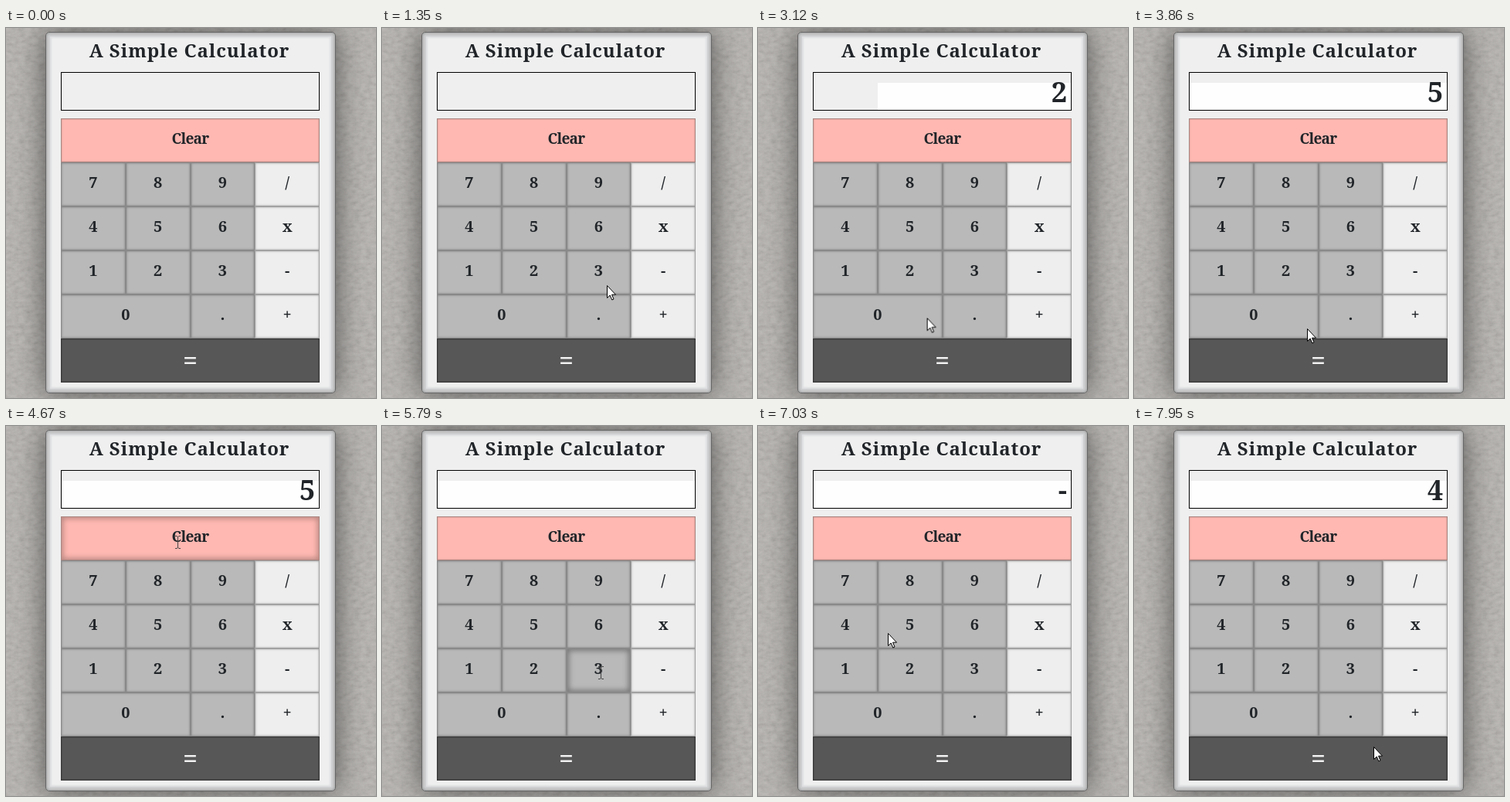
These frames come from a looping animation (479x479 px, 8 s). An HTML page:

```html
<!DOCTYPE html>
<html lang="en">
<head>
<meta charset="utf-8">
<title>A Simple Calculator</title>
<style>
  :root {
    --loop: 8s step-end -5ms infinite;
    --rest: inset 0 0 3px #7d7d7d;
    --down: inset 0 0 7px 2px #777;
  }
  html, body { margin: 0; width: 100%; height: 100%; overflow: hidden; }
  body {
    position: relative;
    background: #b4b1ad;
    color: #212529;
    font: 700 20px "Noto Serif", serif;
  }
  .wall { position: absolute; inset: 0; width: 100%; height: 100%; opacity: .16; }

  .case {
    position: absolute; left: 51px; top: 5px; width: 376px; height: 468px;
    box-sizing: border-box;
    border: 1px solid #666; border-radius: 5px;
    background: #efefef;
    box-shadow: 0 0 38px rgba(0, 0, 0, .55), inset 0 0 4px #858585,
      inset 0 0 0 5px #d0d1d2, inset 0 0 2px 7px #dedfe0;
  }
  h1 {
    position: absolute; left: 0; top: 9px; width: 475px; margin: 0;
    font-size: 24px; line-height: 40px; letter-spacing: .95px;
    text-align: center; white-space: nowrap;
  }

  .screen {
    position: absolute; left: 71px; top: 57px; width: 333px; height: 48px;
    border: 1px solid #000; overflow: hidden;
    background: #efefef;
  }
  .lit {
    position: absolute; left: 100%; right: 0; top: 13px; bottom: 0;
    background: #fefefe;
    animation: lit var(--loop);
  }
  .values {
    position: absolute; right: 5px; top: 0;
    font-size: 36px; line-height: 50px; text-align: right;
    animation: values var(--loop);
  }
  .values span { display: block; height: 48px; }

  .keys {
    position: absolute; left: 71px; top: 117px; width: 335px; height: 342px;
    display: grid; grid-template: repeat(6, 57px) / repeat(4, 1fr);
  }
  .keys div {
    box-sizing: border-box;
    border: 1px solid #898989;
    background: #b9b9b9; box-shadow: var(--rest);
    line-height: 50px; text-align: center;
  }
  .keys .op { --rest: inset 0 0 3px #aaa; background: #eee; border-color: #a2a2a2; }
  .keys .clear {
    --rest: inset 0 0 2px #b98780; --down: inset 0 0 7px 2px #b98780;
    grid-column: span 4; background: #ffb8b2; border-color: #a98681;
    font-size: 19px; letter-spacing: -.7px;
  }
  .keys .zero { grid-column: span 2; }
  .keys .equals {
    --rest: inset 0 0 2px #333; --down: inset 0 0 7px 2px #222;
    grid-column: span 4; background: #575757; border-color: #383838;
    color: #f4f4f4; font-size: 34px; line-height: 54px;
  }

  .three { animation: press-three var(--loop); }
  .plus { animation: press-plus var(--loop); }
  .two { animation: press-two var(--loop); }
  .equals { animation: press-equals var(--loop); }
  .clear { animation: press-clear var(--loop); }
  .minus { animation: press-minus var(--loop); }
  .four { animation: press-four var(--loop); }

  .pointer {
    position: absolute; left: 0; top: 0; width: 1px; height: 1px; overflow: visible;
    animation: travel 8s linear -5ms infinite;
  }
  .arrow { fill: #fff; stroke: #000; animation: arrow var(--loop); }
  .beam { fill: none; stroke: #444; animation: beam var(--loop); }

  @keyframes lit {
    0% { left: 100%; }
    24.125% { left: 167px; }
    37% { left: 83px; }
    46.375%, 100% { left: 0; }
  }
  @keyframes values {
    0% { transform: none; }
    24.125% { transform: translateY(-48px); }
    31.625% { transform: translateY(-96px); }
    37% { transform: translateY(-144px); }
    46.375% { transform: translateY(-192px); }
    60.625% { transform: none; }
    74.375% { transform: translateY(-48px); }
    81.5% { transform: translateY(-240px); }
    95.875%, 100% { transform: translateY(-288px); }
  }

  @keyframes press-three {
    0%, 24.125%, 74.375%, 100% { box-shadow: var(--rest); }
    22.125%, 72.375% { box-shadow: var(--down); }
  }
  @keyframes press-plus {
    0%, 31.625%, 100% { box-shadow: var(--rest); }
    29.25% { box-shadow: var(--down); }
  }
  @keyframes press-two {
    0%, 37%, 100% { box-shadow: var(--rest); }
    35% { box-shadow: var(--down); }
  }
  @keyframes press-equals {
    0%, 46.375%, 100% { box-shadow: var(--rest); }
    44.375% { box-shadow: var(--down); }
  }
  @keyframes press-clear {
    0%, 60.625%, 100% { box-shadow: var(--rest); }
    58.375% { box-shadow: var(--down); }
  }
  @keyframes press-minus {
    0%, 81.5%, 100% { box-shadow: var(--rest); }
    79.25% { box-shadow: var(--down); }
  }
  @keyframes press-four {
    0%, 95.875%, 100% { box-shadow: var(--rest); }
    93.625% { box-shadow: var(--down); }
  }

  @keyframes arrow {
    0%, 56.5%, 70.125%, 91.3125% { visibility: hidden; }
    10.5%, 62.625%, 74.375%, 95.875%, 100% { visibility: visible; }
  }
  @keyframes beam {
    0%, 62.625%, 74.375%, 95.875%, 100% { visibility: hidden; }
    56.5%, 70.125%, 91.3125% { visibility: visible; }
  }
  /* Each move advances in a few jumps, the first one at its start. */
  @keyframes travel {
    0% { transform: translate(430px, 481px); }
    10.5% { transform: translate(430px, 481px); animation-timing-function: steps(7, start); }
    17.9375% { transform: translate(291px, 333px); animation-timing-function: steps(2, start); }
    20.0625% { transform: translate(286px, 316px); }
    24.125% { transform: translate(286px, 316px); animation-timing-function: steps(6, start); }
    29.25% { transform: translate(352px, 369px); }
    31.625% { transform: translate(352px, 369px); animation-timing-function: steps(1, start); }
    32.75% { transform: translate(294px, 353px); animation-timing-function: steps(2, start); }
    35% { transform: translate(203px, 317px); }
    37% { transform: translate(203px, 317px); animation-timing-function: steps(5, start); }
    42.125% { transform: translate(229px, 414px); animation-timing-function: steps(2, start); }
    44.375% { transform: translate(231px, 415px); }
    48.25% { transform: translate(231px, 415px); animation-timing-function: steps(1, start); }
    49.275% { transform: translate(224px, 389px); animation-timing-function: steps(8, start); }
    57.525% { transform: translate(222px, 150px); }
    62.625% { transform: translate(222px, 150px); animation-timing-function: steps(8, start); }
    71.2% { transform: translate(283px, 319px); }
    74.375% { transform: translate(283px, 319px); animation-timing-function: steps(5, start); }
    79.25% { transform: translate(360px, 322px); }
    81.5% { transform: translate(360px, 322px); animation-timing-function: steps(7, start); }
    88.9375% { transform: translate(168px, 268px); animation-timing-function: steps(3, start); }
    92.5% { transform: translate(117px, 259px); }
    95.875% { transform: translate(117px, 259px); animation-timing-function: steps(3, start); }
    99.375% { transform: translate(261px, 376px); animation-timing-function: steps(1, start); }
    100% { transform: translate(310px, 415px); }
  }
</style>
</head>
<body>
  <svg class="wall">
    <filter id="grain" x="0" y="0" width="100%" height="100%">
      <feTurbulence type="fractalNoise" baseFrequency=".12 .2" numOctaves="4" seed="4"/>
      <feColorMatrix values="1 0 0 0 0  1 0 0 0 0  1 0 0 0 0  0 0 0 0 1"/>
    </filter>
    <rect width="100%" height="100%" filter="url(#grain)"/>
  </svg>
  <div class="case"></div>
  <h1>A Simple Calculator</h1>
  <div class="screen">
    <div class="lit"></div>
    <div class="values">
      <span></span><span>3</span><span>+</span><span>2</span><span>5</span><span>-</span><span>4</span>
    </div>
  </div>
  <div class="keys">
    <div class="clear">Clear</div>
    <div>7</div><div>8</div><div>9</div><div class="op">/</div>
    <div class="four">4</div><div>5</div><div>6</div><div class="op">x</div>
    <div>1</div><div class="two">2</div><div class="three">3</div><div class="op minus">-</div>
    <div class="zero">0</div><div>.</div><div class="op plus">+</div>
    <div class="equals">=</div>
  </div>
  <svg class="pointer">
    <path class="arrow" d="M.5 .5V16.5L4.2 13 6.8 19 9 18 6.5 12.2H11.5Z"/>
    <path class="beam" d="M-3 -7.5H-1L.5 -6.5 2 -7.5H4M.5 -6.5V7.5M-3 8.5H-1L.5 7.5 2 8.5H4"/>
  </svg>
</body>
</html>
```
